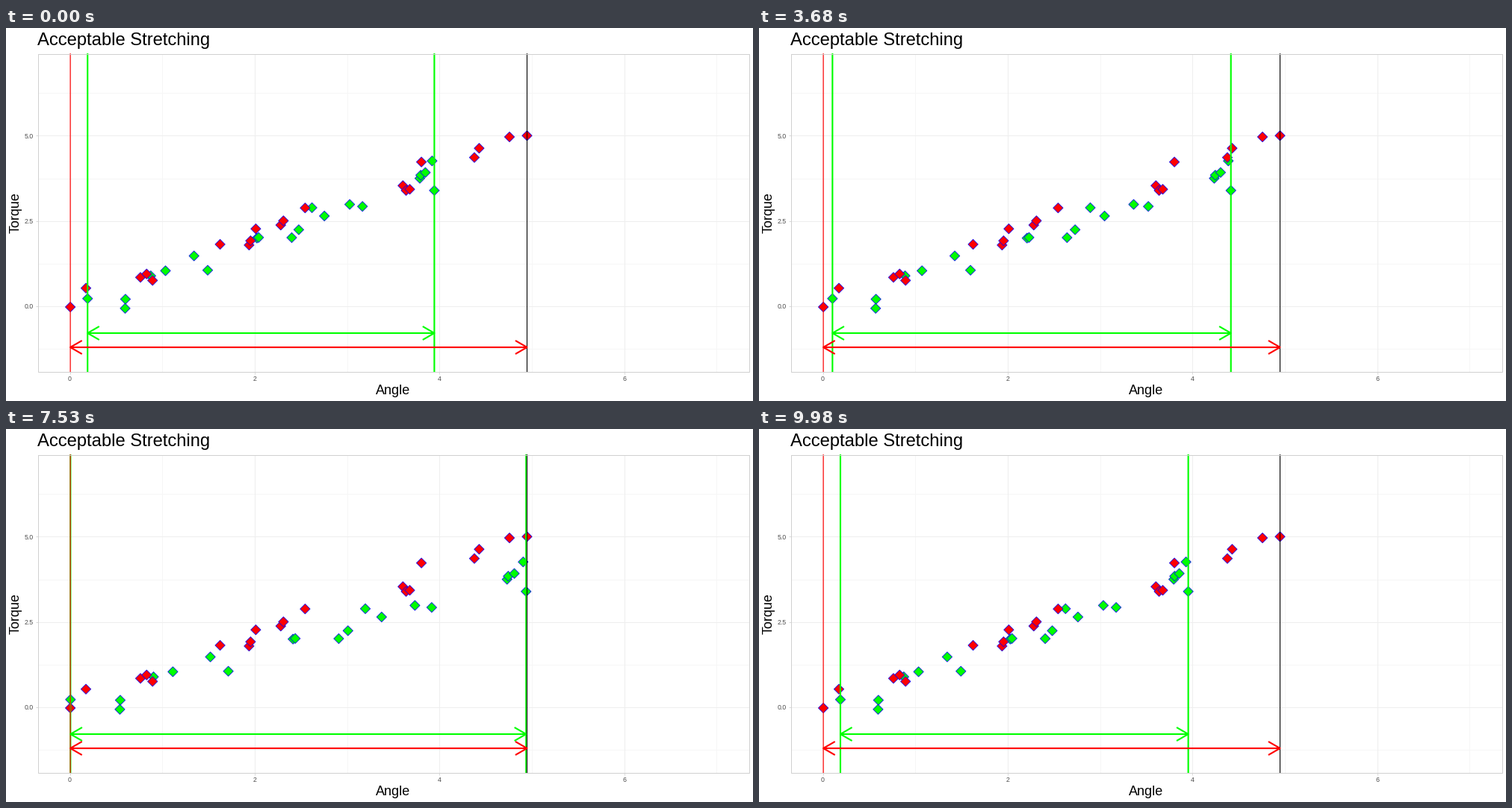
Animation, 1000 px wide and 500 px high, one loop 10000 ms. Source, as a matplotlib script:

```python
import numpy as np
import matplotlib.pyplot as plt
from matplotlib.animation import FuncAnimation
from matplotlib.collections import PolyCollection

PX = 0.72  # points per pixel at 100 dpi
FRAMES, INTERVAL = 400, 25
LEFT, RIGHT, TOP, BOTTOM = 42.5, 994.5, 34.5, 460.5
RED, GREEN = "#ff0000", "#00ff00"

red_pts = np.array([
    (86.1, 374), (107, 348.7), (180, 334.3), (188.3, 329.7), (196.2, 338.4),
    (286.6, 290), (325.4, 291), (327.4, 285.2), (334.4, 269.2),
    (367.8, 264.2), (371.4, 258.4), (400.4, 241.2), (531.3, 211.3),
    (535.6, 217.8), (540.5, 216.2), (556.1, 179.6), (627, 173.6),
    (633.4, 161.2), (674, 146), (697.5, 144.3)])
green_pts = np.array([
    (109.2, 362.7), (159.9, 363.5), (159.5, 375.8), (193.8, 332.2),
    (213.5, 325.4), (251.7, 305.5), (270, 324.7), (335.9, 281.6),
    (338.2, 280.8), (382.5, 281), (391.9, 270.4), (409.6, 240.9),
    (426.2, 252), (460.1, 236.5), (477.2, 239.2), (554, 201.5),
    (555.2, 197.3), (561.4, 193.7), (570.4, 178.2), (573.4, 217.8)])
RED_MIN, RED_MAX = red_pts[0, 0], red_pts[-1, 0]
GREEN_MIN, GREEN_MAX = green_pts[0, 0], green_pts[-1, 0]

fig = plt.figure(figsize=(10, 5), dpi=100, facecolor="white")
ax = fig.add_axes([0, 0, 1, 1])
ax.set(xlim=(0, 1000), ylim=(500, 0))
ax.axis("off")


def x_px(value):
    return 85.5 + 123.68 * value


def y_px(value):
    return 372.9 - 45.68 * value


def line(xs, ys, color, width, z, **kw):
    return ax.plot(xs, ys, color=color, lw=width * PX, zorder=z,
                   solid_capstyle="butt", solid_joinstyle="round", **kw)[0]


def label(x, y, text, size, color="black", **kw):
    return ax.text(x, y, text, fontsize=size * PX, color=color,
                   family="Liberation Sans", va="baseline", **kw)


def diamonds(pts, radius=6.7):
    corners = radius * np.array([(0, -1), (1, 0), (0, 1), (-1, 0)])
    return pts[:, None, :] + corners


def add_diamonds(pts, color, z):
    marks = PolyCollection(diamonds(pts), facecolors=color, edgecolors="blue",
                           linewidths=0.75 * PX, joinstyle="miter",
                           zorder=z, snap=False)
    ax.add_collection(marks, autolim=False)
    return marks


def arrow(x0, x1, y):
    """Double-headed arrow as one broken line."""
    dx, dy = 18 * np.cos(np.pi / 6), 9
    xs = [x0, x1, np.nan, x0 + dx, x0, x0 + dx, np.nan, x1 - dx, x1, x1 - dx]
    ys = [y, y, np.nan, y - dy, y, y + dy, np.nan, y - dy, y, y + dy]
    return xs, ys


# Grid, frame and axes
for v in (1, 3, 5, 7):
    line([x_px(v)] * 2, [TOP, BOTTOM], "#f6f6f6", 1, 1)
for v in (-1.25, 1.25, 3.75, 6.25):
    line([LEFT, RIGHT], [y_px(v)] * 2, "#f6f6f6", 1, 1)
for v in (0, 2, 4, 6):
    x = x_px(v)
    line([x, x], [TOP, BOTTOM], "#eeeeee", 1, 1.1)
    line([x, x], [BOTTOM, BOTTOM + 3], "#d9d9d9", 1, 1.2)
    label(x, 472.8, str(v), 8.8, "#4d4d4d", ha="center")
for v in (0, 2.5, 5):
    y = y_px(v)
    line([LEFT, RIGHT], [y, y], "#eeeeee", 1, 1.1)
    line([LEFT - 3, LEFT], [y, y], "#d9d9d9", 1, 1.2)
    label(37.2, y + 3.2, f"{v:.1f}", 8.8, "#4d4d4d", ha="right")
line([LEFT, RIGHT, RIGHT, LEFT, LEFT], [TOP, TOP, BOTTOM, BOTTOM, TOP],
     "#d0d0d0", 1, 8)

label(42, 23, "Acceptable Stretching", 23.75)
label(518.2, 491, "Angle", 18, ha="center")
label(18, 247.3, "Torque", 18, ha="center", rotation=90,
      rotation_mode="anchor")

# Data
green_marks = add_diamonds(green_pts, GREEN, 2)
add_diamonds(red_pts, RED, 3)
span = [TOP - 0.5, BOTTOM + 0.5]
green_lines = [line([x, x], span, GREEN, 2.13, 4, snap=False)
               for x in (GREEN_MIN, GREEN_MAX)]
line([RED_MIN] * 2, span, RED, 1.2, 5, snap=False)
line([RED_MAX] * 2, span, "black", 1.1, 5, snap=False)
green_arrow = line(*arrow(GREEN_MIN, GREEN_MAX, 409), GREEN, 2.13, 6,
                   snap=False)
line(*arrow(RED_MIN, RED_MAX, 428), RED, 2.13, 7, snap=False)


def stretch(frame):
    """Hold, stretch, hold, relax: a quarter of the loop each."""
    part, step = divmod(frame, FRAMES // 4)
    t = step / (FRAMES // 4)
    return (0, t, 1, 1 - t)[part]


def update(frame):
    t = stretch(frame)
    lo = GREEN_MIN + t * (RED_MIN - GREEN_MIN)
    hi = GREEN_MAX + t * (RED_MAX - GREEN_MAX)
    pts = green_pts.copy()
    pts[:, 0] = np.interp(pts[:, 0], [GREEN_MIN, GREEN_MAX], [lo, hi])
    green_marks.set_verts(diamonds(pts))
    for edge, x in zip(green_lines, (lo, hi)):
        edge.set_xdata([x, x])
    green_arrow.set_data(*arrow(lo, hi, 409))
    return [green_marks, green_arrow, *green_lines]


anim = FuncAnimation(fig, update, frames=FRAMES, interval=INTERVAL,
                     repeat=True, repeat_delay=0, blit=False)
plt.show()
```
